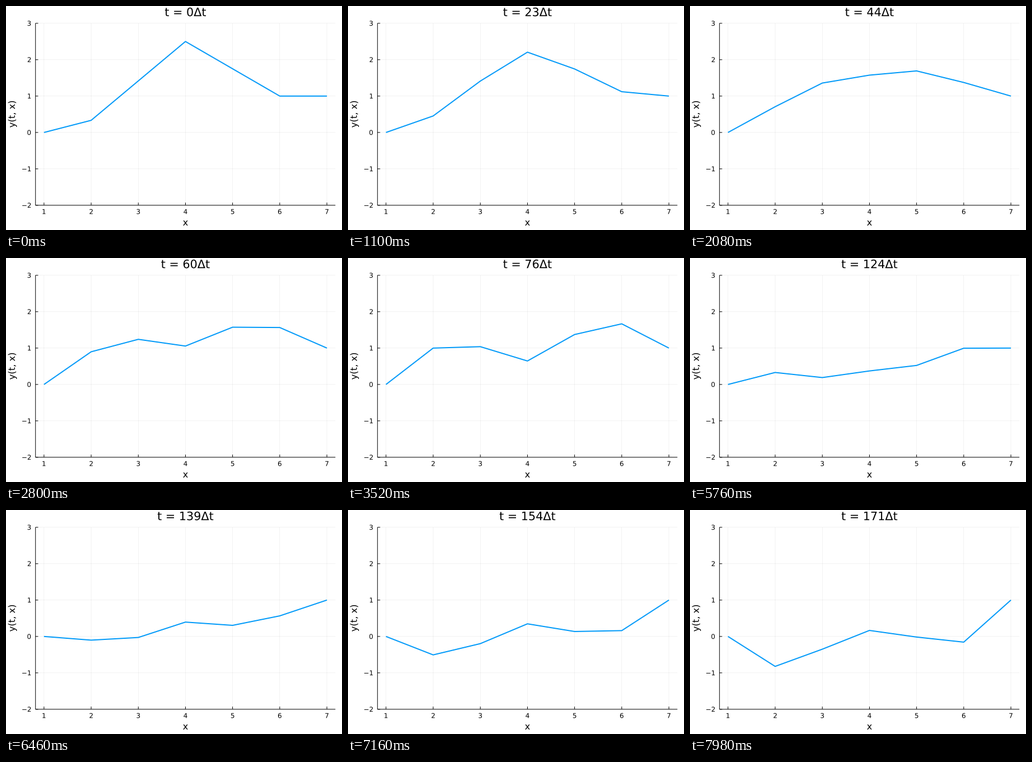
Recreate the animation shown at these times as a matplotlib script. Size 600x400 px, loop 8000 ms.

```python
import numpy as np
import matplotlib.pyplot as plt
from matplotlib.animation import FuncAnimation
from matplotlib.patches import PathPatch
from matplotlib.textpath import TextPath
from matplotlib.transforms import Affine2D

W, H = 600, 400
LEFT, RIGHT, TOP, BOTTOM = 52.69, 588.19, 30.87, 355.8
MID_X, MID_Y = (LEFT + RIGHT) / 2, (TOP + BOTTOM) / 2
TICK = 4.72
SMALL, MEDIUM, LARGE = 11.85, 16.3, 20.74

# At 72 dpi one point is one pixel.
plt.rcParams["font.family"] = "DejaVu Sans"
fig = plt.figure(figsize=(W / 72, H / 72), dpi=72, facecolor="white")
ax = fig.add_axes([0, 0, 1, 1])
ax.set_xlim(0, W)
ax.set_ylim(H, 0)
ax.axis("off")


def px(x):
    return LEFT + (np.asarray(x) - 0.82) / 6.36 * (RIGHT - LEFT)


def py(y):
    return BOTTOM - (np.asarray(y) + 2) / 5 * (BOTTOM - TOP)


def text_path(x, y, text, size, align=0.5, angle=0):
    """Outline of text with its baseline at (x, y), free of pixel rounding."""
    path = TextPath((0, 0), text, size=size)
    box = path.get_extents()
    shift = box.x0 + align * box.width
    move = Affine2D().translate(-shift, 0).scale(1, -1)
    return path.transformed(move.rotate_deg(-angle).translate(x, y))


def label(*args, **kw):
    return ax.add_patch(PathPatch(text_path(*args, **kw), fc="black", lw=0,
                                  snap=False, zorder=4))


def rules(xs, ys, x_ends, y_ends, **style):
    ax.vlines(xs, *y_ends, snap=False, **style)
    ax.hlines(ys, *x_ends, snap=False, **style)


# Grid, ticks, axes and labels
xs, ys = np.arange(1, 8), np.arange(-2, 4)
grid = dict(color="black", alpha=0.1, lw=0.5, zorder=1)
ink = dict(color="black", lw=1, zorder=2)
rules(px(xs), py(ys), (LEFT, RIGHT), (TOP, BOTTOM), **grid)
rules(px(xs), py(ys), (LEFT, LEFT + TICK), (BOTTOM - TICK, BOTTOM), **ink)
rules(LEFT, BOTTOM, (LEFT, RIGHT), (TOP, BOTTOM), **ink)

for x in xs:
    label(px(x), 371.4, str(x), SMALL)
for y in ys:
    label(44.2, py(y) + 4.32, str(y).replace("-", "\u2212"), SMALL, align=1)
label(MID_X, 392, "x", MEDIUM)
label(16, MID_Y, "y(t, x)", MEDIUM, angle=90)
title = label(MID_X, 18.14, "t", LARGE)
line, = ax.plot([], [], color="#009af9", lw=2, zorder=3, snap=False,
                solid_joinstyle="round", solid_capstyle="butt")

# Discrete string with fixed ends, solved by its sine modes
SPEED = 0.0253
rest = np.linspace(0, 1, 7)
start = np.array([0, 1 / 3, 17 / 12, 5 / 2, 7 / 4, 1, 1])
k = np.arange(1, 6)
modes = np.sin(np.pi * np.outer(k, np.arange(7)) / 6)
amps = modes @ (start - rest) / 3
omega = 2 * SPEED * np.sin(np.pi * k / 12)


def height(step):
    return rest + (amps * np.cos(omega * step)) @ modes


def step_at(frame):
    # Three steps every 140 ms, held for 20, 100 and 20 ms
    cycle, slot = divmod(frame, 7)
    return 3 * cycle + (slot > 0) + (slot > 5)


def update(frame):
    step = step_at(frame)
    line.set_data(px(xs), py(height(step)))
    title.set_path(text_path(MID_X, 18.14, f"t = {step}\u0394t", LARGE))
    return line, title


anim = FuncAnimation(fig, update, frames=400, interval=20, repeat=True,
                     repeat_delay=0, blit=False)
plt.show()
```
